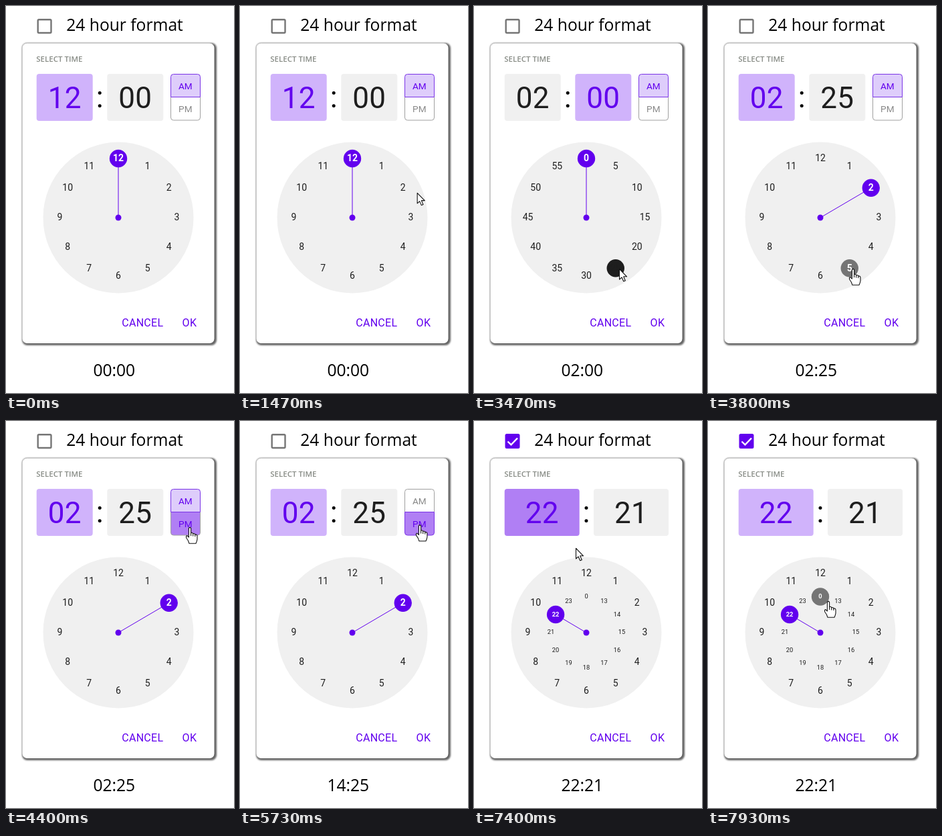
An HTML page for the animation above (8 s loop, 341 by 576 pixels).

```html
<!DOCTYPE html>
<html lang="en">
<head>
<meta charset="utf-8">
<title>Time picker</title>
<style>
  html, body { margin: 0; width: 100%; height: 100%; overflow: hidden; background: #fff; }
  svg { display: block; width: 341px; height: 576px; }
  .sans { font-family: "Open Sans", "Noto Sans", sans-serif; }
  .ui { font-family: Roboto, Arial, sans-serif; }
  .card { fill: #fff; }
  .shadow { fill: #666; filter: blur(1.2px); }
</style>
</head>
<body>
<svg id="stage" viewBox="0 0 341 576"></svg>
<script>
const LOOP = 8000, TICK = 200 / 3;
const PURPLE = '#6200ee', ACTIVE = '#d0b3fb', HOVER = '#b07ff4', INK = '#1e1e1e', PALE = '#f0f0f0';
const CX = 168, CY = 314.5;
const stage = document.getElementById('stage');

// Pointer path: tick, x, y
const path = [
  [18, 318, 283], [24, 246, 276], [38, 246, 276], [49, 217, 391], [57, 217, 391],
  [64, 275, 162], [66, 275, 158], [85, 275, 158], [95, 60, 32], [107, 60, 32],
  [111, 152, 189], [119, 180, 268]
];

function pointer(tick) {
  if (tick < 19) return [-99, -99];
  const i = path.findIndex(p => p[0] >= tick);
  const [a, b] = [path[i - 1], path[i]];
  const k = (tick - a[0]) / (b[0] - a[0]), e = k * k * (3 - 2 * k);
  return [a[1] + (b[1] - a[1]) * e, a[2] + (b[2] - a[2]) * e];
}

function stateAt(tick) {
  const full = tick >= 103;
  return {
    full,
    minutes: tick >= 34 && tick < 57,
    hour: full ? 22 : tick >= 31 ? 2 : 12,
    minute: full ? 21 : tick >= 54 ? 25 : 0,
    pm: tick >= 72,
    result: full ? '22:21' : tick >= 74 ? '14:25' : tick >= 54 ? '02:25' : tick >= 31 ? '02:00' : '00:00',
    checked: tick >= 100,
    pressed: (tick >= 29 && tick < 31) || (tick >= 52 && tick < 54)
  };
}

const pad = n => String(n).padStart(2, '0');
const inside = ([px, py], x, y, w, h) => px >= x && px < x + w && py >= y && py < y + h;
const rect = (x, y, w, h, r, fill, extra = '') =>
  `<rect x="${x}" y="${y}" width="${w}" height="${h}" rx="${r}" fill="${fill}" ${extra}/>`;
const circle = (x, y, r, fill, extra = '') => `<circle cx="${x}" cy="${y}" r="${r}" fill="${fill}" ${extra}/>`;
const text = (s, x, y, size, fill, extra = '', font = 'ui') =>
  `<text class="${font}" x="${x}" y="${y}" font-size="${size}" fill="${fill}" ${extra}>${s}</text>`;
const mid = 'text-anchor="middle"';

function checkbox(tick, checked) {
  let out = '';
  if (tick >= 94 && tick < 98) out += circle(58, 30, 20, '#000', 'opacity=".04"');
  if (tick >= 100 && tick < 109) out += circle(58, 30, 21, PURPLE, 'opacity=".06"');
  return out + (checked
    ? rect(46.5, 19, 22, 22, 2.5, PURPLE) +
      '<path d="M50.5 30.5L55.5 35.3L65 25.5" fill="none" stroke="#fff" stroke-width="2.4"/>'
    : rect(47.7, 20.2, 19.8, 19.8, 1.5, 'none', 'stroke="#757575" stroke-width="2.4"'));
}

function display(s, late) {
  const w = s.full ? 112 : 84, right = s.full ? 179 : 151.3;
  const box = (x, value, active) => {
    const hot = inside(late, x, 101, w, 70);
    return rect(x, 101, w, 70, 4, hot ? HOVER : active ? ACTIVE : PALE) +
      text(pad(value), x + w / 2, 152, 44, active || hot ? PURPLE : INK, mid + ' letter-spacing=".3"');
  };
  return box(45.7, s.hour, !s.minutes) + box(right, s.minute, s.minutes) +
    text(':', s.full ? 168 : 140.3, 151, 45, '#000', mid);
}

function halfDay(s, at) {
  if (s.full) return '';
  const half = (label, y, on) => {
    const hot = inside(at, 246, y, 45, 35), lower = y > 110;
    const shape = lower
      ? `M246.5 ${y}H290.5V166Q290.5 170 286.5 170H250.5Q246.5 170 246.5 166Z`
      : `M246.5 ${y + 34}V105.5Q246.5 101.5 250.5 101.5H286.5Q290.5 101.5 290.5 105.5V${y + 34}Z`;
    return `<path d="${shape}" fill="${hot ? HOVER : on ? '#decdfb' : '#fff'}" stroke="${on ? '#7b35e6' : '#a0a0a0'}"/>` +
      text(label, 268.3, y + 22.5, 13.6, on || hot ? PURPLE : '#888', mid);
  };
  const am = half('AM', 101.5, !s.pm), pm = half('PM', 135.5, s.pm);
  return s.pm ? am + pm : pm + am;
}

function tips(s) {
  const list = [];
  const ring = (radius, size, label, chosen) => {
    for (let i = 0; i < 12; i++) {
      const a = i * Math.PI / 6, n = label(i);
      list.push({ n, size, x: CX + radius * Math.sin(a), y: CY - radius * Math.cos(a), on: n === chosen });
    }
  };
  if (s.minutes) ring(87.5, 14, i => i * 5, s.minute);
  else ring(87.5, 14, i => i || 12, s.hour);
  if (s.full) ring(53, 9.3, i => i && i + 12, s.hour);
  return list;
}

function clock(list, hot, pressed) {
  const on = list.find(t => t.on);
  return circle(CX, 315, 112.5, PALE) +
    `<path d="M${CX} 315L${on.x} ${on.y}" stroke="${PURPLE}"/>` + circle(CX, 315, 4.5, PURPLE) +
    list.map(t => {
      const disc = t.on ? PURPLE : t === hot ? (pressed ? INK : '#757575') : '';
      const lit = t.on || (t === hot && !pressed);
      return (disc && circle(t.x, t.y, 13.2, disc)) +
        text(t.n, t.x, t.y - .6 + t.size * .355, t.size, lit ? '#fff' : INK, mid + (lit ? ' font-weight="600"' : ''));
    }).join('');
}

function cursor([x, y], hand) {
  const d = hand
    ? 'M-1.6 1.6Q0-.8 1.6 1.6V8.5Q4.2 7.8 4.7 9.8Q7.2 9 7.8 11Q10.6 10.4 11 13V18Q10.6 21 9 24.3H-1Q-2 20-5 16.5Q-6.5 13-4 12.6L-1.6 15ZM1.6 8.5V13M4.7 9.8V13.5M7.8 11V14'
    : 'M.5.5V16L4 12.8L6.7 18.8L9.3 17.7L6.7 11.8H11.6Z';
  return `<path transform="translate(${x} ${y})" d="${d}" fill="#fff" stroke="#111" stroke-width="1.1" stroke-linejoin="round"/>`;
}

function draw(tick) {
  const s = stateAt(tick), at = pointer(tick), late = pointer(tick - 1), list = tips(s);
  const hot = list.find(t => !t.on && Math.hypot(t.x - at[0], t.y - at[1]) < 14);
  const hand = (hot && !s.pressed) || inside(at, 46, 19, 23, 23) || inside(at, 46, 101, 112, 70) ||
    inside(at, 151, 101, 84, 70) || (!s.full && inside(at, 246, 101, 45, 70));
  stage.innerHTML =
    checkbox(tick, s.checked) +
    text('24 hour format', 90.3, 37, 24.6, '#000', '', 'sans') +
    '<rect class="shadow" x="24" y="55" width="291" height="450" rx="8"/>' +
    '<rect class="card" x="24.5" y="55.5" width="287" height="446.5" rx="7"/>' +
    text('SELECT TIME', 45.3, 83, 11.5, '#888c86', 'font-weight="600"', 'sans') +
    display(s, late) + halfDay(s, at) + clock(list, hot, s.pressed) +
    text('CANCEL', 173.2, 477, 16, PURPLE, 'letter-spacing=".3"') +
    text('OK', 263.6, 477, 16, PURPLE, 'letter-spacing=".3"') +
    text(s.result, 130.4, 551, 24.6, '#000', '', 'sans') +
    cursor(at, hand);
}

let shown = -1;
function frame() {
  const tick = Math.floor((performance.now() % LOOP + 4) / TICK) % 120;
  if (tick !== shown) draw(shown = tick);
  requestAnimationFrame(frame);
}
frame();
</script>
</body>
</html>
```
